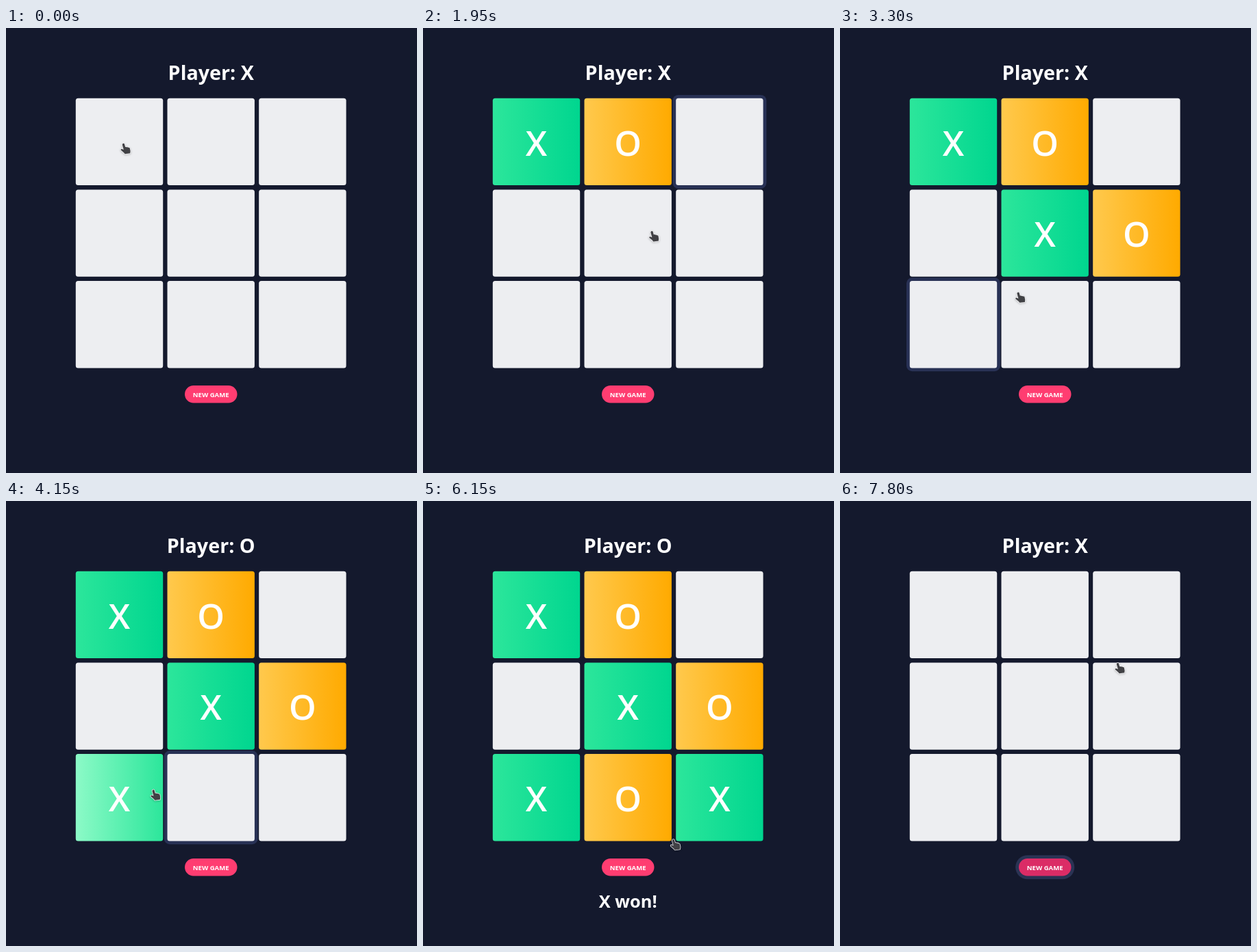
Animation of 600x651 px, one loop 8 s. Source, as an HTML page with a canvas:

```html
<!DOCTYPE html>
<html lang="en">
<head>
<meta charset="utf-8">
<title>Tic-tac-toe</title>
<style>
  html, body { margin: 0; width: 100%; height: 100%; overflow: hidden; background: #14192d; }
  canvas { display: block; width: 600px; height: 651px; }
</style>
</head>
<body>
<canvas id="stage" width="600" height="651"></canvas>
<script>
const LOOP = 8000, STEP = 50, REST = 50, MAX_TRAVEL = 1000;
const SIZE = 127.4, PITCH = 133.7, RING = 4.8;
const BUTTON = { x: 261, y: 523, w: 76.5, h: 25.5 };
const CELLS = Array.from({ length: 9 }, (_, i) => ({
  x: 101.8 + i % 3 * PITCH, y: 102.7 + Math.floor(i / 3) * PITCH, w: SIZE, h: SIZE
}));

// Where the fingertip clicks, and when. Whatever lies under it reacts.
const CLICKS = [
  { t: 200, x: 171.5, y: 169 },
  { t: 1300, x: 302, y: 181 },
  { t: 2050, x: 336, y: 304 },
  { t: 2600, x: 413.5, y: 299 },
  { t: 3900, x: 200, y: 421 },
  { t: 4750, x: 297, y: 431 },
  { t: 5550, x: 433, y: 440 },
  { t: 7200, x: 315.5, y: 536 }
];
const STOPS = [...CLICKS, { t: 7800, x: 405.5, y: 237 }];
const MOVES = CLICKS.slice(0, -1).map(click => ({ t: click.t, cell: CELLS.findIndex(box => isOver(box, click)) }));
const RESET = CLICKS[CLICKS.length - 1].t;

const COLORS = {
  X: ['#8cfac7', '#2ce69b', '#00d68f'],
  O: ['#ffe59e', '#ffc94d', '#ffaa00']
};

const ctx = document.getElementById('stage').getContext('2d');
const hand = new Path2D(
  'M3.2 1.6 C4 .4 5.6 .6 6 1.9 L7.2 6.2 C8 5.7 9 5.8 9.6 6.5 C10.4 6.1 11.3 6.3 11.8 7 ' +
  'C12.8 6.8 13.7 7.3 13.9 8.4 L14.6 12 L14.2 15.3 L6.6 16.2 L5.2 14.4 L.9 10.8 ' +
  'C.2 9.9 .9 8.7 2.1 9 L4.8 10 L2.9 3.2 C2.7 2.6 2.8 2 3.2 1.6 Z');

function isOver(box, { x, y }) {
  return x > box.x && x < box.x + box.w && y > box.y && y < box.y + box.h;
}

// Rest after each click, then ease to the next stop.
function pointerAt(t) {
  const next = STOPS.findIndex(stop => stop.t > t);
  if (next === 0) return STOPS[0];
  if (next < 0) return STOPS[STOPS.length - 1];
  const from = STOPS[next - 1], to = STOPS[next], leave = from.t + REST;
  const p = Math.min(1, Math.max(0, (t - leave) / Math.min(to.t - leave, MAX_TRAVEL)));
  const eased = p * p * (3 - 2 * p);
  return { x: from.x + (to.x - from.x) * eased, y: from.y + (to.y - from.y) * eased };
}

function fillBox(box, radius, fill, grow = 0) {
  ctx.fillStyle = fill;
  ctx.beginPath();
  ctx.roundRect(box.x - grow, box.y - grow, box.w + 2 * grow, box.h + 2 * grow, radius + grow);
  ctx.fill();
}

function label(text, x, baseline, size, weight = 700) {
  ctx.font = `${weight} ${size}px "Open Sans", sans-serif`;
  ctx.textAlign = 'center';
  ctx.fillStyle = '#fff';
  ctx.fillText(text, x, baseline);
}

function drawCell(box, mark, pointer, focused) {
  if (focused) fillBox(box, 3.5, '#283155', RING);
  if (!mark) return fillBox(box, 3.5, '#edeef1');
  const shade = isOver(box, pointer) ? 0 : 1;
  const gradient = ctx.createLinearGradient(box.x, 0, box.x + box.w, 0);
  gradient.addColorStop(0, COLORS[mark][shade]);
  gradient.addColorStop(1, COLORS[mark][shade + 1]);
  fillBox(box, 3.5, gradient);
  label(mark, box.x + SIZE / 2, box.y + 84, 50.5, 600);
}

function drawButton(pointer, focused) {
  const radius = BUTTON.h / 2;
  if (focused) fillBox(BUTTON, radius, '#2a3354', RING);
  fillBox(BUTTON, radius, focused ? '#db2c66' : isOver(BUTTON, pointer) ? '#ff678a' : '#ff3d71');
  label('NEW GAME', 299.2, 539.6, 9.6);
}

function drawPointer({ x, y }) {
  ctx.save();
  ctx.translate(x - 4.5, y - 1);
  ctx.shadowColor = 'rgba(0, 0, 0, .3)';
  ctx.shadowBlur = 3;
  ctx.shadowOffsetY = 1;
  ctx.lineWidth = 1.6;
  ctx.lineJoin = 'round';
  ctx.strokeStyle = 'rgba(245, 245, 247, .9)';
  ctx.stroke(hand);
  ctx.shadowColor = 'transparent';
  ctx.fillStyle = '#414145';
  ctx.fill(hand);
  ctx.restore();
}

function draw(t) {
  const pointer = pointerAt(t), reset = t >= RESET;
  const played = reset ? [] : MOVES.filter(move => move.t <= t);
  const marks = {};
  played.forEach(({ cell }, n) => { marks[cell] = 'XO'[n % 2]; });
  const focus = played.length ? played[played.length - 1].cell + 1 : -1;

  ctx.fillStyle = '#14192d';
  ctx.fillRect(0, 0, 600, 651);
  label('Player: ' + 'XO'[played.length % 2], 299.2, 75.6, 28.7);
  CELLS.forEach((box, i) => drawCell(box, marks[i], pointer, i === focus));
  drawButton(pointer, reset);
  if (played.length === MOVES.length) label('X won!', 299.3, 595.4, 25.4);
  drawPointer(pointer);
}

const start = performance.now();
function frame() {
  const t = (performance.now() - start) % LOOP;
  draw(Math.floor(t / STEP) * STEP);
  requestAnimationFrame(frame);
}
frame();
</script>
</body>
</html>
```
